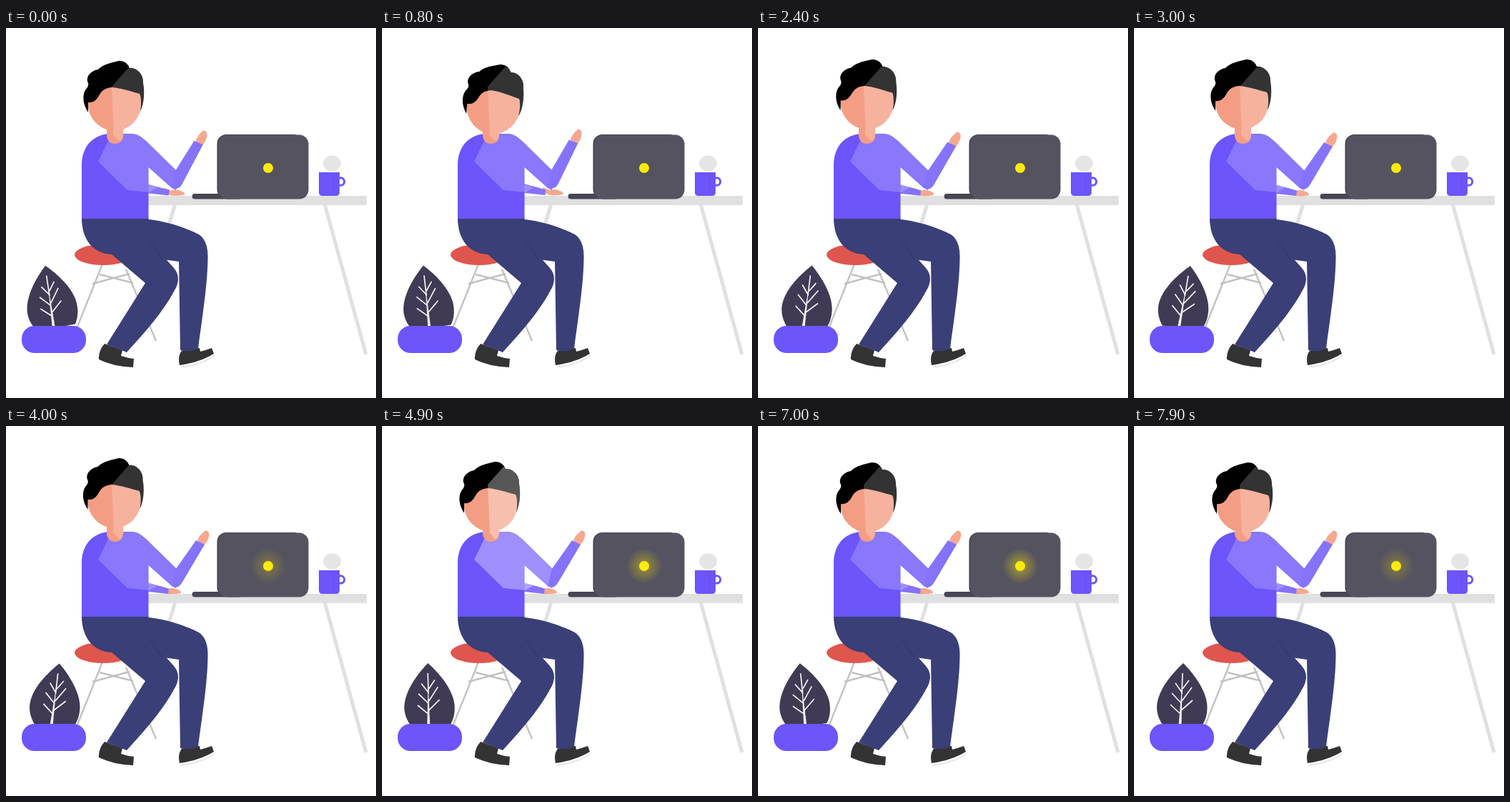
An HTML page for the animation above (8000 ms loop, 518x518 px).

```html
<!DOCTYPE html>
<html lang="en">
<head>
<meta charset="utf-8">
<title>Desk scene</title>
<style>
html, body { margin: 0; width: 100%; height: 100%; overflow: hidden; background: #fff; }
svg { display: block; width: 100vw; height: 100vh; }
.shirt { fill: #6b55fb; }
.sleeve { fill: #8573fc; }
.skin { fill: #f39e84; }
.palm { fill: #f5a88f; }
.pants { fill: #3a3f78; }
.dark { fill: #333; }
.light { fill: #fff; }
.line { fill: none; stroke: #e0e0e0; stroke-width: 5; }
.thin { fill: none; stroke: #c2c2c2; stroke-width: 2.4; }
</style>
</head>
<body>
<svg viewBox="0 0 518 518">
  <defs>
    <path id="hair" d="M115 118C107 106 107 94 111 87C114 83 116 81 115 77C111 69 118 60 129 58C137 50 147 49 158 46C167 46 171 51 173 56C184 55 193 66 192 77C194 88 194 104 188 117C190 104 189 96 187 92C175 89 161 84 148 83C139 84 134 87 130 95C126 102 121 105 115 104Z"/>
    <ellipse id="face" cx="152" cy="105" rx="37.5" ry="39"/>
    <clipPath id="headClip"><use href="#hair"/><use href="#face"/></clipPath>
    <radialGradient id="shine">
      <stop offset=".2" stop-color="#ffeb00" stop-opacity=".4"/>
      <stop offset="1" stop-color="#ffeb00" stop-opacity="0"/>
    </radialGradient>
  </defs>

  <!-- table -->
  <path class="line" d="M237 246L228 276M446 246L504 457"/>
  <path fill="#e0e0e0" d="M198 235H505V248H198Z"/>

  <!-- chair -->
  <path class="thin" d="M136 328L100 418M168 338L210 438M121 358L173 344M131 345L178 357"/>
  <ellipse cx="136" cy="317.500" rx="40" ry="14.500" fill="#de564d"/>

  <!-- plant -->
  <g id="leaf">
    <path fill="#403a55" d="M69 332C57 343 33 368 32 393C32 405 36 412 41 420H95C100 412 102.500 405 102.500 393C102 370 82 345 69 332Z"/>
    <path fill="none" stroke="#f4f4f6" stroke-width="1.700" d="M68 346L67 375M65 403L51 390M66 388L53 374M67 373L58 360M65 399L82 384M67 385L81 366M68 368L77 356"/>
    <path fill="#f4f4f6" d="M67.500 360L62.500 419H66.500Z"/>
  </g>
  <rect class="shirt" x="22" y="417" width="90" height="38" rx="18"/>

  <!-- legs and shoes -->
  <path d="M245 475Q275 471 291 459" fill="none" stroke="#e6e6e6" stroke-width="2"/>
  <path class="dark" d="M138 442L163 451L161 459Q170 462 179 463L178 475Q150 474 130 464Q129 452 138 442ZM246 452L271 448L272 453Q280 451 288 448L291 456Q272 468 243 472Q240 459 246 452Z"/>
  <path class="pants" d="M190 267C220 269 248 278 270 289Q282 297 282.500 318C283 355 274 410 269 449Q256 455 244 451L242 327L205 322Z"/>
  <path class="pants" d="M106 266H199.500V297C212 309 224 324 235 336Q247 350 235 369C220 397 198 422 169 454L141 443L195 357L148 317C122 316 106 296 106 266Z"/>
  <path d="M201 298L218 323" stroke="#30356a" stroke-width="1"/>

  <!-- torso and arms -->
  <path id="hand" class="palm" d="M216 224L226 228Q232 226 238 228Q246 231 245 234Q235 236 226 235L216 231Z"/>
  <path id="cuff" class="sleeve" d="M190 217L228 227.500L227 235L180 230Z"/>
  <path class="shirt" d="M106 267V190C107 165 122 149 146 148H177C186 149 190 153 196 158L241 202L238 227L232 224L199.500 195V267Z"/>
  <path class="shirt" d="M170 227L199 219V233Z"/>
  <path class="light hl" d="M148 148H177C186 149 190 153 196 158L241 202L238 227L232 224L199.500 195V219L212 223L201 230L170 227L129 187Z"/>
  <g id="wave">
    <path class="palm" d="M268 160Q271 152 280 146Q286 148 284 155Q282 163 276 168Z"/>
    <path class="sleeve" d="M238 200L266 160L278 166L246 220Q240 229 232 224Z"/>
  </g>

  <!-- head -->
  <path class="skin" d="M141 138V152Q143 162 153 162Q164 161 164 150V138Z"/>
  <path class="light hl" d="M150 138H164V150Q163 156 159 159L150 149Z"/>
  <g id="head">
    <use href="#face" class="skin"/>
    <use href="#hair"/>
  </g>
  <path class="light hl" clip-path="url(#headClip)" d="M172 55L148 82L151 150H205V55Z"/>

  <!-- laptop -->
  <rect x="260.500" y="232" width="70" height="7.500" rx="3.700" fill="#484653"/>
  <rect x="295.500" y="149" width="120" height="90" rx="13" fill="#403e49"/>
  <rect x="297" y="149.500" width="126.500" height="90" rx="13" fill="#55535f"/>
  <circle id="glow" cx="367" cy="196" r="25" fill="url(#shine)"/>
  <circle cx="367" cy="196" r="7" fill="#ffeb0a"/>

  <!-- mug -->
  <ellipse cx="456.500" cy="189.500" rx="12.500" ry="11" fill="#e5e5e5"/>
  <circle cx="468.500" cy="215" r="5.200" fill="none" stroke="#6b55fb" stroke-width="3"/>
  <path class="shirt" d="M438 202H467V230Q467 235 462 235H443Q438 235 438 230Z"/>
  <path d="M459 202V235" stroke="#6450ee" stroke-width="1"/>
</svg>
<script>
const LOOP = 8000, STEP = 100;
const el = id => document.getElementById(id);
const lights = document.querySelectorAll('.hl');

// Each key is [time, value]; values between keys follow a cosine ease.
const tracks = {
  headX: [[0, 0], [800, 4], [1800, 2.5], [3000, -1], [4900, 0], [6000, 1]],
  headY: [[0, 0], [800, 4.5], [1800, -2], [3700, -2], [4900, 4], [5600, 5]],
  tilt: [[0, 0], [800, 4], [1800, 2], [3000, 0]],
  reach: [[0, .6], [800, 1], [1800, .45], [2800, 0]],
  glow: [[2800, 0], [4900, .85], [7000, 1], [7900, .55]]
};

function track(name, t) {
  const keys = tracks[name];
  const i = keys.findIndex(k => k[0] > t);
  if (i === 0) return keys[0][1];
  if (i < 0) return keys[keys.length - 1][1];
  const [t0, a] = keys[i - 1], [t1, b] = keys[i];
  return a + (b - a) * (1 - Math.cos(Math.PI * (t - t0) / (t1 - t0))) / 2;
}

const move = (id, value) => el(id).setAttribute('transform', value);

function draw(now) {
  const t = Math.floor(now % LOOP / STEP) * STEP;
  const reach = track('reach', t);
  const sway = -9.2 * (Math.cos(2 * Math.PI * (t - 110) / 6100) + .17);
  const phase = t % 1450;
  const light = phase >= 270 && phase < 600 ? .34 : .2;

  // The highlight stays put while the head moves underneath it.
  const head = `translate(${track('headX', t)} ${track('headY', t)}) rotate(${track('tilt', t)} 152 105)`;
  move('head', head);
  move('headClip', head);
  move('wave', `translate(${reach} ${-1.5 * reach}) rotate(${-4.7 * reach} 239 222)`);
  move('hand', `translate(${9 * reach} ${-reach})`);
  move('cuff', `translate(${1.5 * reach} ${-reach})`);
  move('leaf', `rotate(${sway} 66 407)`);
  el('glow').setAttribute('opacity', track('glow', t));
  lights.forEach(p => p.setAttribute('opacity', light));
  requestAnimationFrame(() => draw(performance.now() - start));
}

const start = performance.now();
draw(0);
</script>
</body>
</html>
```
